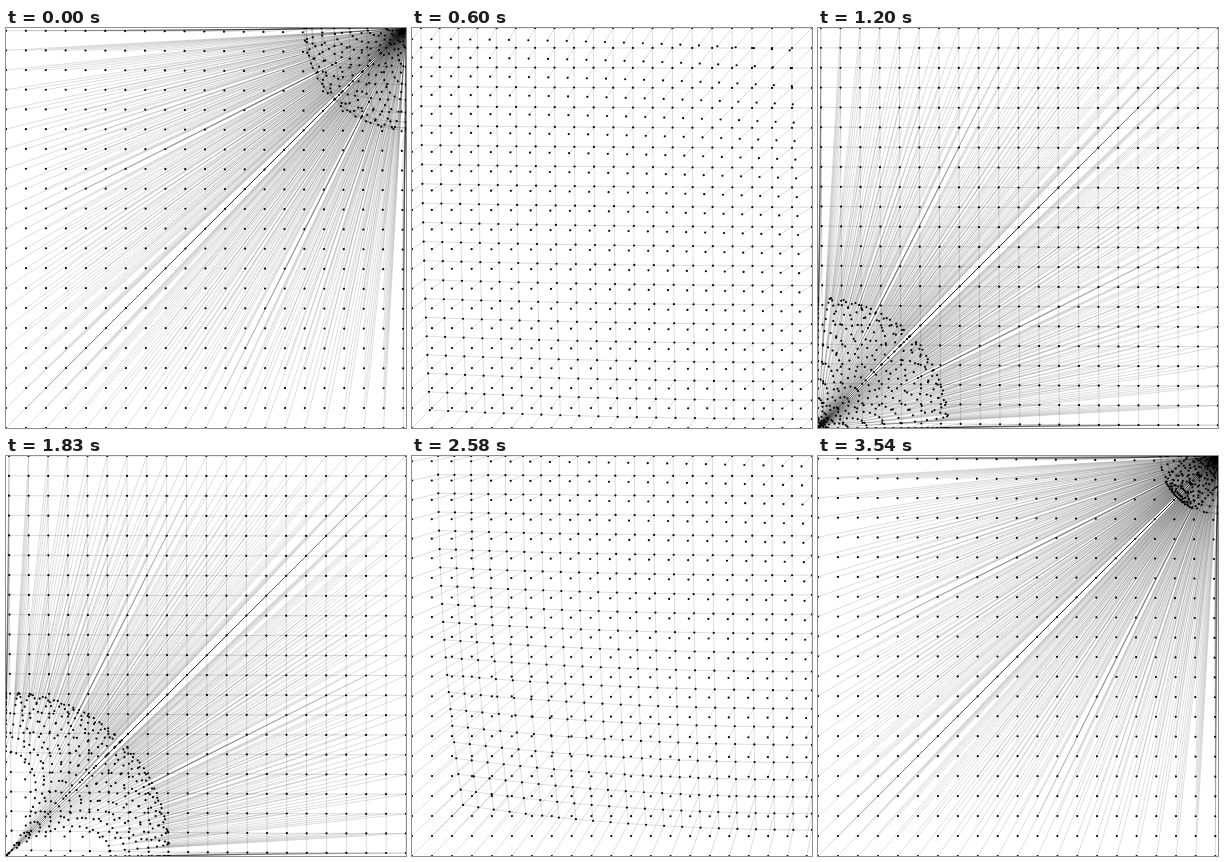
Recreate the animation shown at these times as an HTML page with a canvas. Size 400x400 px, loop 3600 ms.

```html
<!DOCTYPE html>
<html>
<head>
<meta charset="utf-8">
<style>
  html, body { margin: 0; width: 100%; height: 100%; overflow: hidden; background: #fff; }
  canvas { display: block; }
</style>
</head>
<body>
<canvas id="stage" width="400" height="400"></canvas>
<script>
const SIZE = 400, STEP = 20, N = SIZE / STEP + 1;
const LOOP = 3600, TICK = 30;
const MAX_R = 2055;
const ctx = document.getElementById('stage').getContext('2d');

// [ms, phase]: a nearly steady half turn per loop
const START = 0.2239;
const PHASES = [
  [0, START], [600, 0.8135], [1200, 1.3165], [1830, 1.8563],
  [2310, 2.3281], [2850, 2.7786], [3540, 3.3104], [LOOP, START + Math.PI]
];

function phaseAt(t) {
  const i = PHASES.findIndex(k => k[0] > t);
  const [t0, a] = PHASES[i - 1], [t1, b] = PHASES[i];
  return a + (b - a) * (t - t0) / (t1 - t0);
}

// Rolls the flat grid onto a sphere of radius r that touches it at (cx, cy)
function wrapGrid(cx, cy, r) {
  const pts = [];
  for (let j = 0; j < N; j++) {
    for (let i = 0; i < N; i++) {
      const dx = i * STEP - cx, dy = j * STEP - cy;
      const d = Math.hypot(dx, dy);
      const s = d ? r * Math.sin(d / r) / d : 1;
      pts.push([cx + dx * s, cy + dy * s]);
    }
  }
  return pts;
}

function line(a, b) {
  ctx.beginPath();
  ctx.moveTo(a[0], a[1]);
  ctx.lineTo(b[0], b[1]);
  ctx.stroke();
}

function dot(p) {
  ctx.beginPath();
  ctx.arc(p[0], p[1], 1.1, 0, 2 * Math.PI);
  ctx.fill();
}

function draw(t) {
  const phase = phaseAt(t);
  const net = wrapGrid(SIZE, 0, MAX_R * Math.sin(phase) ** 2 + 0.5);
  const loose = wrapGrid(0, SIZE, MAX_R * Math.cos(phase) ** 2 + 0.5);

  ctx.fillStyle = '#fff';
  ctx.fillRect(0, 0, SIZE, SIZE);
  ctx.fillStyle = ctx.strokeStyle = '#000';
  ctx.lineWidth = 0.14;
  net.forEach((p, k) => {
    line(p, loose[k]);
    if (k % N) line(p, net[k - 1]);
    if (k >= N) line(p, net[k - N]);
  });
  net.forEach(dot);
  loose.forEach(dot);
}

const begin = performance.now();
function frame() {
  const t = (performance.now() - begin) % LOOP;
  draw(Math.floor(t / TICK) * TICK);
  requestAnimationFrame(frame);
}
frame();
</script>
</body>
</html>
```
